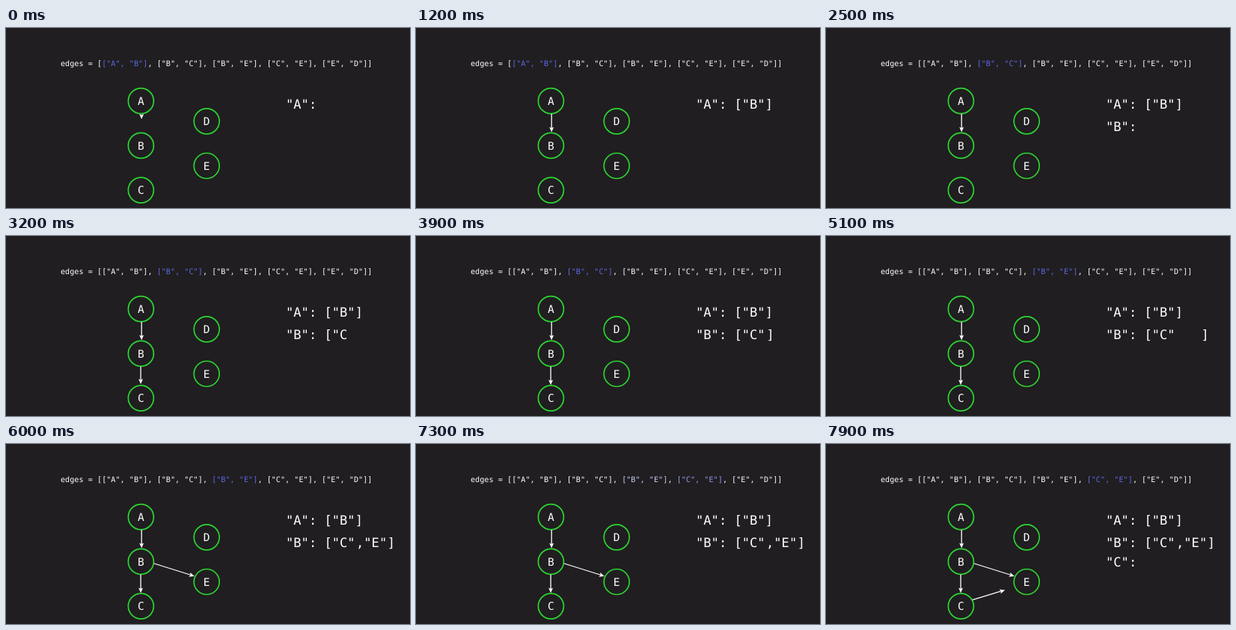
An HTML page that plays this animation: 540x241 px, repeating every 8000 ms.

```html
<!DOCTYPE html>
<html lang="en">
<head>
<meta charset="utf-8">
<title>Edge list to adjacency list</title>
<style>
@property --p { syntax: "<number>"; inherits: true; initial-value: 0; }

html, body { margin: 0; width: 100%; height: 100%; overflow: hidden; background: #201e20; }
body {
  --hot: #5b68e4;
  position: relative; color: #fff;
  font-family: "DejaVu Sans Mono", "Noto Sans Mono", monospace;
  text-rendering: geometricPrecision;
}
svg { position: absolute; left: 0; top: 0; }
div { position: absolute; white-space: pre; }
div, span, .arrow { animation: 8s linear infinite; }

.edges { left: 73px; top: 41.6px; font-size: 10.18px; line-height: 14px; }
.big { font-size: 17.14px; line-height: 24px; height: 24px; overflow: hidden; }
.row1 { top: 91.1px; }
.row2 { top: 121px; }
.row3 { top: 146.6px; }
.key { left: 374px; }
.val { left: 425.4px; }

.node circle { fill: none; stroke: #2cd532; stroke-width: 1.7; }
.node text { fill: #fff; font-size: 14.5px; text-anchor: middle; }
.arrow { fill: #fff; }
.arrow rect { transform: scaleX(var(--p)); }
.arrow use { transform: translateX(calc(var(--p) * var(--d) * 1px)); }

/* highlighted pair */
#p1 { animation-name: p1; }
#p2 { animation-name: p2; }
#p3 { animation-name: p3; }
#p4 { animation-name: p4; }
@keyframes p1 { 0%, 21.25% { color: var(--hot); } 25%, 100% { color: #fff; } }
@keyframes p2 { 0%, 21.25% { color: #fff; } 25%, 56.25% { color: var(--hot); } 60%, 100% { color: #fff; } }
@keyframes p3 { 0%, 56.25% { color: #fff; } 60%, 88.75% { color: var(--hot); } 92.5%, 100% { color: #fff; } }
@keyframes p4 { 0%, 88.75% { color: #fff; } 92.5%, 100% { color: var(--hot); } }

/* typed text */
#valA { animation-name: valA; }
#keyB { animation-name: keyB; }
#valB { animation-name: valB; }
#addE { left: 468px; animation-name: addE; }
#keyC { animation-name: keyC; }
@keyframes valA { 0%, 3.75% { width: 0; animation-timing-function: steps(5); } 13.125%, 100% { width: 5ch; } }
@keyframes keyB { 0%, 23.75% { width: 0; animation-timing-function: steps(4); } 30.625%, 100% { width: 4ch; } }
@keyframes valB { 0%, 33.125% { width: 0; animation-timing-function: steps(4); } 40.625%, 100% { width: 4ch; } }
@keyframes addE { 0%, 66.875% { width: 0; animation-timing-function: steps(4); } 74.375%, 100% { width: 4ch; } }
@keyframes keyC { 0%, 90.625% { width: 0; animation-timing-function: steps(4); } 95.625%, 100% { width: 4ch; } }

/* closing bracket makes room for the second neighbour */
#close { left: 467.5px; animation-name: shown, slide; }
@keyframes shown { 0%, 42.49% { visibility: hidden; } 42.5%, 100% { visibility: visible; } }
@keyframes slide {
  0%, 46.44% { margin-left: 0; animation-timing-function: cubic-bezier(.36, 0, .64, 1); }
  70.8%, 100% { margin-left: 42.3px; }
}

/* arrows */
#ab { --d: 17.5; animation-name: ab; }
#bc { --d: 17.5; animation-name: bc; }
#be { --d: 49.5; animation-name: be; }
#ce { --d: 51.5; animation-name: ce; }
@keyframes ab { 0% { --p: 0; animation-timing-function: ease-in-out; } 10%, 100% { --p: 1; } }
@keyframes bc {
  0%, 31.87% { --p: 0; visibility: hidden; }
  31.88% { --p: 0; visibility: visible; animation-timing-function: ease-in-out; }
  41.88%, 100% { --p: 1; visibility: visible; }
}
@keyframes be {
  0%, 64.37% { --p: 0; visibility: hidden; }
  64.38% { --p: 0; visibility: visible; animation-timing-function: ease-in-out; }
  74.38%, 100% { --p: 1; visibility: visible; }
}
@keyframes ce {
  0%, 93.12% { --p: 0; visibility: hidden; }
  93.13% { --p: 0; visibility: visible; animation-timing-function: ease-in; }
  98.75% { --p: .74; visibility: visible; }
  100% { --p: .88; visibility: visible; }
}
</style>
</head>
<body>
<svg width="540" height="241" viewBox="0 0 540 241">
  <defs><path id="head" d="M0 -3L7 0L0 3L1.5 0Z"/></defs>
  <g class="node" transform="translate(180.4 97.7)"><circle r="17"/><text y="5.3">A</text></g>
  <g class="node" transform="translate(180.4 157.4)"><circle r="17"/><text y="5.3">B</text></g>
  <g class="node" transform="translate(180.4 217.1)"><circle r="17"/><text y="5.3">C</text></g>
  <g class="node" transform="translate(268.2 124.8)"><circle r="17"/><text y="5.3">D</text></g>
  <g class="node" transform="translate(268.2 184.5)"><circle r="17"/><text y="5.3">E</text></g>
  <g transform="translate(181.2 115) rotate(90)"><g class="arrow" id="ab"><rect y="-.65" width="19" height="1.3"/><use href="#head"/></g></g>
  <g transform="translate(180.1 175) rotate(90)"><g class="arrow" id="bc"><rect y="-.65" width="19" height="1.3"/><use href="#head"/></g></g>
  <g transform="translate(198 160) rotate(17.4)"><g class="arrow" id="be"><rect y="-.65" width="51" height="1.3"/><use href="#head"/></g></g>
  <g transform="translate(196 208.6) rotate(-16.8)"><g class="arrow" id="ce"><rect y="-.65" width="53" height="1.3"/><use href="#head"/></g></g>
</svg>
<div class="edges">edges = [<span id="p1">["A", "B"]</span>, <span id="p2">["B", "C"]</span>, <span id="p3">["B", "E"]</span>, <span id="p4">["C", "E"]</span>, ["E", "D"]]</div>
<div class="big row1 key">"A":</div>
<div class="big row1 val" id="valA">["B"]</div>
<div class="big row2 key" id="keyB">"B":</div>
<div class="big row2 val" id="valB">["C"</div>
<div class="big row2" id="addE">,"E"</div>
<div class="big row2" id="close">]</div>
<div class="big row3 key" id="keyC">"C":</div>
</body>
</html>
```
